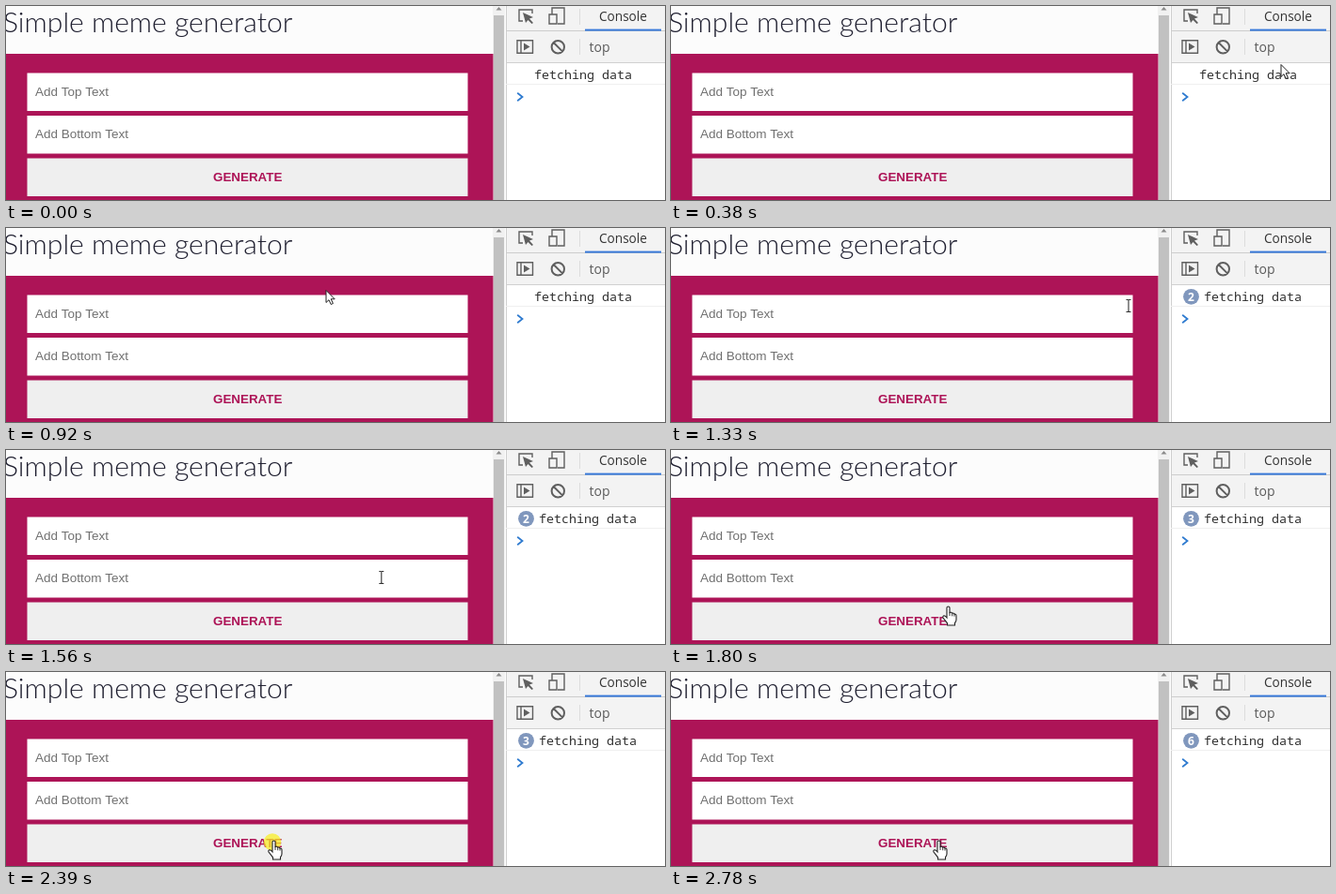
Animation of 700 by 207 pixels, one loop 2930 ms. Source, as an HTML page with a canvas:

```html
<!DOCTYPE html>
<html lang="en">
<head>
<meta charset="utf-8">
<title>Simple meme generator</title>
<style>
html, body { margin: 0; width: 100%; height: 100%; overflow: hidden; background: #fff; }
canvas { display: block; }
</style>
</head>
<body>
<canvas id="stage" width="700" height="207"></canvas>
<script>
const ctx = document.getElementById('stage').getContext('2d');
const LOOP = 2930;
const SANS = '"Open Sans", sans-serif';
const ARIAL = '"Liberation Sans", Arial, sans-serif';
const MONO = '"Noto Sans Mono", monospace';

// Pointer path: time, x, y
const PATH = [
  [70, 524, 74], [300, 640, 67], [380, 648, 62], [530, 648, 62],
  [920, 340, 66], [990, 340, 66], [1070, 262, 182], [1170, 262, 182],
  [1330, 486, 83], [1400, 486, 83], [1480, 555, 75], [1630, 276, 184],
  [1720, 276, 184], [1800, 295, 167], [1870, 295, 167], [2020, 590, 74],
  [2180, 285, 180], [LOOP, 285, 180]
];
const CLICKS = [1070, 1630, 2370, 2520, 2655];
const CLICK_TIME = 90;

function rect(x, y, w, h, color) {
  ctx.fillStyle = color;
  ctx.fillRect(x, y, w, h);
}

function disc(x, y, r, color) {
  ctx.fillStyle = color;
  ctx.beginPath();
  ctx.arc(x, y, r, 0, Math.PI * 2);
  ctx.fill();
}

function text(str, x, y, font, color, align = 'left') {
  ctx.font = font;
  ctx.fillStyle = color;
  ctx.textAlign = align;
  ctx.fillText(str, x, y);
}

function stroke(d, color, width) {
  ctx.strokeStyle = color;
  ctx.lineWidth = width;
  ctx.stroke(new Path2D(d));
}

function fill(d, color) {
  ctx.fillStyle = color;
  ctx.fill(new Path2D(d));
}

function drawPage() {
  rect(0, 0, 517, 51, '#fcfcfc');
  text('Simple meme generator', -3, 27.5, '300 30.1px Lato, sans-serif', '#1f1f30');

  rect(517, 0, 13, 207, '#f1f1f1');
  rect(518, 10, 11, 197, '#c1c1c1');
  fill('M520.5 4.5L523.5 1L526.5 4.5Z', '#8a8a8a');

  rect(0, 51, 517.5, 156, '#ad1457');
  rect(22.5, 71.5, 468, 40.5, '#fff');
  rect(22.5, 117, 468, 40.5, '#fff');
  rect(22.5, 162.5, 468, 40.5, '#efefef');
  text('Add Top Text', 31, 95.5, '13.5px ' + ARIAL, '#707070');
  text('Add Bottom Text', 31, 141, '13.5px ' + ARIAL, '#707070');
  text('GENERATE', 256.7, 186.7, 'bold 13.4px ' + ARIAL, '#ad1457', 'center');
}

function drawToolbars() {
  rect(530, 0, 170, 207, '#fff');
  rect(531, 0, 169, 60, '#f3f3f3');
  rect(531, 0, 1, 207, '#cfcfcf');
  rect(531, 26, 169, 1, '#cdcdcd');
  rect(531, 60, 169, 1, '#d0d0d0');
  rect(531, 83, 169, 1, '#efefef');
  rect(615, 24.6, 81, 2, '#3879d9');
  rect(609, 3, 1, 17, '#dcdcdc');
  rect(609, 35, 1, 17, '#dcdcdc');

  const ink = '#5f5f5f';
  stroke('M549 16H545V4H559V8', ink, 1.4);
  fill('M549 7L560 12L556 13.5L560 18L558.5 19L554.5 15L552 18Z', ink);
  stroke('M580 9V2H593V19H586M577 9H585V19H577Z', ink, 1.4);
  stroke('M543 36.8H559.5V50.2H543ZM547 36.8V50.2', ink, 1.4);
  fill('M550 39.5L556.5 43.5L550 47.5Z', ink);
  stroke('M593 43.7A6.7 6.7 0 1 1 579.6 43.7A6.7 6.7 0 1 1 593 43.7M581.6 39L591 48.4', ink, 2);

  text('Console', 630, 16, '13.6px ' + SANS, '#333');
  text('top', 619.5, 48.5, '14px ' + SANS, '#5a5a5a');
  stroke('M543.2 92.8L548.5 97L543.2 101.2', '#2f7bd0', 1.8);
}

function drawLog(count) {
  if (count > 1) {
    disc(552.5, 73.3, 8.4, '#8097bd');
    text(count, 552.5, 77.7, 'bold 12px ' + SANS, '#fff', 'center');
  }
  text('fetching data', count > 1 ? 566 : 561, 78, '13.33px ' + MONO, '#303030');
}

function pointerAt(t) {
  const next = PATH.findIndex(key => key[0] > t);
  const [t0, x0, y0] = PATH[next - 1];
  const [t1, x1, y1] = PATH[next];
  const p = (t - t0) / (t1 - t0);
  const ease = p * p * (3 - 2 * p);
  return [x0 + (x1 - x0) * ease, y0 + (y1 - y0) * ease];
}

function drawHand() {
  const hand = 'M-2 1.3Q-2 0 -.5 0Q1 0 1 1.3V6.5Q3 5.6 3.7 7.2Q5.5 6.6 6 8.2' +
    'Q8 7.8 8 9.7V14Q8 16 6.5 17.5V20H-1.5V17.8L-6 12Q-6.7 10.5 -5 9.8Q-4 9.6 -2 12Z';
  fill(hand, '#fff');
  stroke(hand, '#222', 1.1);
  stroke('M1 6.5V10M3.7 7.3V10.3M6 8.3V10.6', '#222', 0.9);
}

function drawArrow() {
  const arrow = 'M0 .5V13.5L3 10.7L5.2 15.5L7.4 14.5L5.2 9.8H9.2Z';
  fill(arrow, '#fff');
  stroke(arrow, '#222', 1);
}

function drawBeam() {
  stroke('M-2.5 -6.5H-.8L0 -5.8L.8 -6.5H2.5M0 -5.8V5.8M-2.5 6.5H-.8L0 5.8L.8 6.5H2.5', '#333', 1.1);
}

function drawPointer(t) {
  const [x, y] = pointerAt(t);
  if (CLICKS.some(c => t >= c && t < c + CLICK_TIME)) {
    disc(x - 2, y + 1.5, 9.3, 'rgba(250, 238, 30, 0.72)');
  }
  const inside = (top, bottom) => x > 23 && x < 491 && y > top && y < bottom;
  ctx.save();
  ctx.translate(x, y);
  if (inside(162, 203)) drawHand();
  else if (inside(71, 112) || inside(117, 157)) drawBeam();
  else drawArrow();
  ctx.restore();
}

function frame(now) {
  const t = now % LOOP;
  drawPage();
  drawToolbars();
  drawLog(1 + CLICKS.filter(c => t >= c + CLICK_TIME).length);
  if (t >= PATH[0][0]) drawPointer(t);
  requestAnimationFrame(frame);
}
requestAnimationFrame(frame);
</script>
</body>
</html>
```
